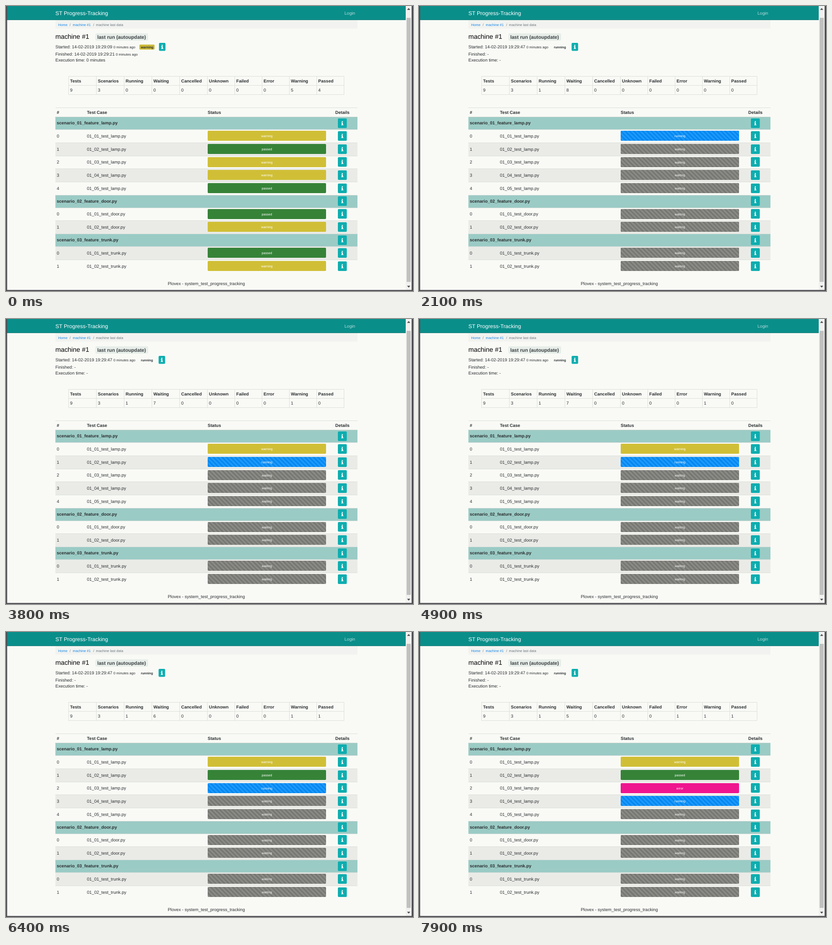
Recreate the animation shown at these times as an HTML page. Size 894 px wide and 626 px high, loop 8 s.

```html
<!DOCTYPE html>
<html lang="en">
<head>
<meta charset="utf-8">
<title>Test progress</title>
<style>
  html, body { margin: 0; width: 100%; height: 100%; overflow: hidden; background: #f9faf6; }
  svg { display: block; font-family: "Liberation Sans", Arial, sans-serif; text-rendering: geometricPrecision; }
</style>
</head>
<body>
<svg width="894" height="626" viewBox="0 0 894 626">
  <defs id="stripes"></defs>
  <g id="page"></g>
</svg>
<script>
const LOOP = 8000, STEP = 100;
const REM = 9.57, SMALL = REM * 0.8, LABEL = REM * 0.75;
const INK = '#2b2f31', LINE = '#dcdfdb', TEAL = '#9bcbc5';
const FILLS = {
  warning: '#d0bf36', passed: '#368338', error: '#ef158f',
  running: 'url(#running)', waiting: 'url(#waiting)'
};
const BUTTON_X = { warning: 336, running: 335.2, waiting: 333.3 };
const COUNTERS = ['Running', 'Waiting', 'Cancelled', 'Unknown', 'Failed', 'Error', 'Warning', 'Passed'];
const SCENARIOS = [['lamp', 5], ['door', 2], ['trunk', 2]];
const TOTAL = 9;

// Each stage lists finished tests; the next test runs unless the badge says otherwise.
const stages = [
  { at: 0, badge: 'warning', done: 'warning passed warning warning passed passed warning passed warning' },
  { at: 1300, badge: 'running', done: '' },
  { at: 3400, badge: 'waiting', done: 'warning' },
  { at: 3500, badge: 'running', done: 'warning' },
  { at: 5500, badge: 'waiting', done: 'warning passed' },
  { at: 5600, badge: 'running', done: 'warning passed' },
  { at: 7700, badge: 'waiting', done: 'warning passed error' },
  { at: 7800, badge: 'running', done: 'warning passed error' }
];

const rect = (x, y, w, h, fill, r = 0) =>
  `<rect x="${x}" y="${y}" width="${w}" height="${h}" rx="${r}" fill="${fill}"/>`;
const text = (x, y, str, { size = REM, fill = INK, bold = false, anchor = 'start' } = {}) =>
  `<text x="${x}" y="${y}" font-size="${size}" fill="${fill}" text-anchor="${anchor}"` +
  `${bold ? ' font-weight="700"' : ''}>${str}</text>`;
const small = (x, y, str, fill) => text(x, y, str, { size: SMALL, fill });
const bold = (x, y, str) => text(x, y, str, { bold: true });

function infoButton(x, y, w, h) {
  return rect(x, y, w, h, '#0eadaf', 2) +
    `<path transform="translate(${x + w / 2} ${y + h / 2})" fill="#fff"
      d="M-1.3-4.5H1.2V-2.4H-1.3ZM-2.2-1.5H1.2V2.9H2.3V4.4H-2.3V2.9H-1.2V0H-2.2Z"/>`;
}

function chrome() {
  return rect(0, 0, 894, 626, '#f9faf6') +
    rect(108.5, 31, 663.5, 18.5, '#f2f3f0') +
    rect(2, 0, 876, 31, '#0a8e8a') + rect(2, 30, 876, 1, '#23827e') +
    text(108.5, 20, 'ST Progress-Tracking', { size: REM * 1.25, fill: '#fff' }) +
    text(743.5, 19, 'Login', { fill: '#b5dcda' }) +
    small(114.5, 44, 'Home', '#1485e8') + small(139.8, 44, '/', '#6c757d') +
    small(146.6, 44, 'machine #1', '#1485e8') + small(191.5, 44, '/', '#6c757d') +
    small(197.6, 44, 'machine last data', '#6c757d') +
    text(440, 613.3, 'Plovex - system_test_progress_tracking', { anchor: 'middle' }) +
    rect(878, 0, 13, 624, '#f1f1ef') + rect(880, 26, 9, 580, '#c1c1c0') +
    '<path d="M881 8.5L884.5 4.5L888 8.5ZM881 614.5L884.5 618.5L888 614.5Z" fill="#45484b"/>' +
    rect(0, 0, 2.5, 626, '#4b4c50') + rect(891, 0, 3, 626, '#4b4c50') +
    rect(0, 623.7, 894, 2.3, '#4b4c50');
}

function summary(badge, finished) {
  const badgeFill = badge === 'warning' ? '#cbb937' : 'none';
  return text(108.5, 72, 'machine #1', { size: REM * 1.5, fill: '#000' }) +
    rect(196.5, 60, 115.5, 16, '#e7eee9', 2) +
    text(200.4, 72, 'last run (autoupdate)', { size: REM * 1.125, bold: true, fill: '#3b4143' }) +
    text(108.5, 93, `Started: 14-02-2019 19:29:${finished ? '09' : '47'}`) +
    small(236, 93, '0 minutes ago') +
    rect(293, 84.7, 33.3, 11, badgeFill, 2) +
    text(296.2, 92.6, badge, { size: LABEL, bold: true }) +
    infoButton(BUTTON_X[badge], 81, 14.3, 17.6) +
    text(108.5, 109, `Finished: ${finished ? '14-02-2019 19:29:21' : '-'}`) +
    (finished ? small(241.2, 109, '0 minutes ago') : '') +
    text(108.5, 122, `Execution time: ${finished ? '0 minutes' : '-'}`);
}

function counters(statuses) {
  const edge = i => 137 + 60 * i + Math.min(i, 5);
  const values = COUNTERS.map(name => statuses.filter(s => s === name.toLowerCase()).length);
  const cells = [TOTAL, SCENARIOS.length, ...values];
  let out = [154, 174, 194].map(y => rect(137, y, 606, 1, LINE)).join('');
  for (let i = 0; i <= cells.length; i++) out += rect(edge(i), 154, 1, 40, LINE);
  ['Tests', 'Scenarios', ...COUNTERS].forEach((name, i) => {
    out += bold(edge(i) + 3.8, 167.8, name) + text(edge(i) + 3.8, 187.6, cells[i]);
  });
  return out;
}

function statusBar(top, status) {
  return `<g transform="translate(443 ${Math.round(top + 3)})">` +
    rect(0, 0, 260, 22, FILLS[status], 2) +
    text(130, 13.6, status, { size: LABEL, fill: '#fff', anchor: 'middle' }) + '</g>';
}

function results(statuses) {
  let out = rect(108.5, 223, 663.5, 1, LINE) +
    bold(111.4, 237, '#') + bold(177.7, 237, 'Test Case') + bold(443, 237, 'Status') +
    text(739, 237, 'Details', { bold: true, anchor: 'middle' });
  let top = 243.3, row = 0, test = 0;
  const openRow = (height, fill) => {
    const y = Math.round(top);
    out += rect(108.5, y, 663.5, Math.round(top + height) - y, fill) +
      rect(108.5, y, 663.5, 1, LINE) + infoButton(729, Math.round(top + 3.6), 19.6, 21);
  };
  SCENARIOS.forEach(([name, count], s) => {
    openRow(28, TEAL);
    out += bold(111.4, top + 17.1, `scenario_0${s + 1}_feature_${name}.py`);
    top += 28;
    row++;
    for (let i = 0; i < count; i++) {
      openRow(28.7, row++ % 2 ? 'none' : '#eaebe7');
      out += text(111.4, top + 17.6, i) +
        text(177.7, top + 17.6, `01_0${i + 1}_test_${name}.py`) +
        statusBar(top, statuses[test++]);
      top += 28.7;
    }
  });
  return out;
}

function drawPage({ badge, done }) {
  const statuses = done.split(' ').filter(Boolean);
  const finished = statuses.length === TOTAL;
  if (badge === 'running') statuses.push('running');
  while (statuses.length < TOTAL) statuses.push('waiting');
  document.getElementById('page').innerHTML =
    chrome() + summary(badge, finished) + counters(statuses) + results(statuses);
}

const stripe = (id, light, dark) => `
  <linearGradient id="${id}" gradientUnits="userSpaceOnUse" spreadMethod="repeat"
    x1="0" y1="${REM}" x2="${REM / 2}" y2="${REM / 2}">
    <stop offset="0.04" stop-color="${light}"/><stop offset="0.46" stop-color="${light}"/>
    <stop offset="0.54" stop-color="${dark}"/><stop offset="0.96" stop-color="${dark}"/>
    <stop offset="1" stop-color="${light}"/>
  </linearGradient>`;
const defs = document.getElementById('stripes');
defs.innerHTML = stripe('running', '#1c99fa', '#0587f0') + stripe('waiting', '#8a8a85', '#767673');

let shown;
function frame() {
  const time = Math.floor(performance.now() % LOOP / STEP) * STEP;
  const stage = stages.filter(s => s.at <= time).pop();
  if (stage !== shown) drawPage(shown = stage);
  const shift = -REM * ((time - 1300) / 1000);
  for (const gradient of defs.children) gradient.setAttribute('gradientTransform', `translate(${shift} 0)`);
  requestAnimationFrame(frame);
}
frame();
</script>
</body>
</html>
```
